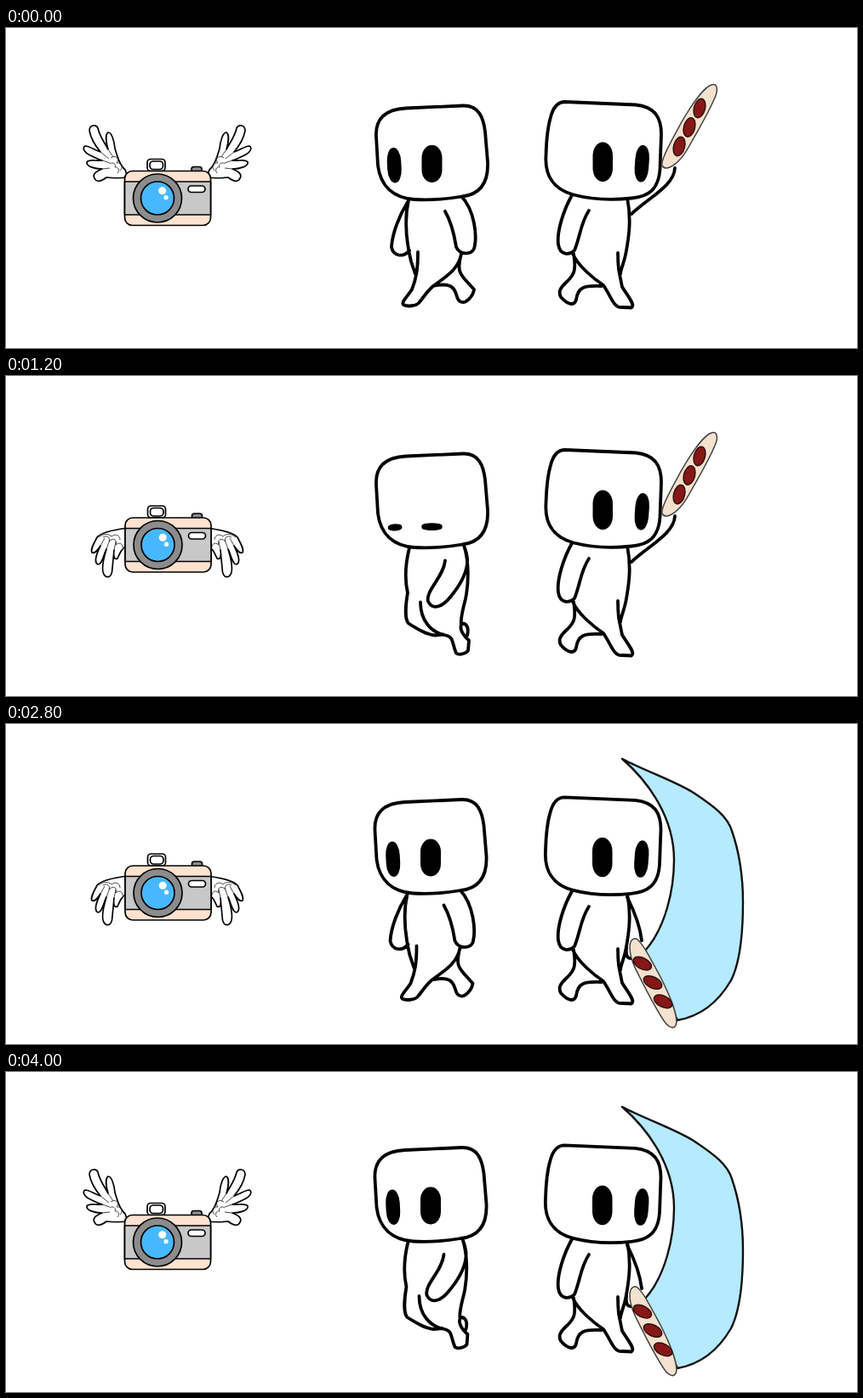
Recreate the animation shown at these times as an HTML page. Size 1000 px wide and 377 px high, loop 4200 ms.

```html
<!DOCTYPE html>
<html lang="en">
<head>
<meta charset="utf-8">
<title>Camera and walkers</title>
<style>
  html, body { margin: 0; width: 100%; height: 100%; overflow: hidden; background: #fff; }
  svg { display: block; width: 100%; height: 100%; }
  .line { fill: none; stroke: #000; stroke-width: 3.8; stroke-linecap: round; stroke-linejoin: round; }
  .solid { fill: #fff; }
  .thin { stroke: #000; stroke-width: 1.7; stroke-linejoin: round; }
  .curl { fill: none; stroke: #333; stroke-width: .9; }
</style>
</head>
<body>
<svg viewBox="0 0 1000 377" preserveAspectRatio="none">
  <defs>
    <g id="wing">
      <path class="thin solid" id="wingShape"/>
      <path class="curl" id="wingCurl"/>
    </g>
  </defs>

  <use href="#wing"/>
  <use href="#wing" transform="translate(379 0) scale(-1 1)"/>
  <g id="camera" class="thin">
    <rect x="166" y="154.5" width="21" height="14" rx="4" fill="#fff"/>
    <rect x="169" y="157" width="15.5" height="9.5" rx="4" fill="#fff"/>
    <path d="M218 169V166Q218 163.5 221 163.5H227Q230 163.5 230 166V169Z" fill="#8c8c8c"/>
    <rect x="139.5" y="168.500" width="101" height="64" rx="9" fill="#ffe2d0"/>
    <rect x="139.5" y="181" width="101" height="39" fill="#c8c8c8"/>
    <circle cx="178" cy="200.5" r="28.5" fill="#8c8c8c"/>
    <circle cx="178" cy="200.5" r="19.5" fill="#47b8ff"/>
    <g fill="#fff" stroke="none">
      <circle cx="183.7" cy="191.8" r="4.5"/>
      <circle cx="188" cy="199.7" r="2.6"/>
    </g>
    <rect x="214" y="186" width="20" height="7.5" rx="3.7" fill="#fff"/>
  </g>

  <path id="walkBody" class="line"/>
  <g id="walkHead">
    <path class="line solid" d="M470 94.5L537 91.5C556 91 561 106 563 122L566 158C567 182 557 196 536 198.5C515 202 495 203 480 202C455 200 440 186 437 162L435 128C434 108 444 96 470 94.5Z"/>
    <rect id="eyeL" x="448" width="16.5" rx="8" transform="rotate(-3 456 162)"/>
    <rect id="eyeR" x="488.5" width="24" rx="11.5"/>
  </g>

  <path class="line" d="M665 197C655 215 647 240 649 255C651 268 662 268 668 262C675 245 675 230 685 215M666 266C672 280 690 295 702 303C712 318 714 330 724 329L735 329.5C740 326 730 315 724 305L720 285C719 275 719 270 719 265M730 200C735 225 732 245 729 262C727 275 722 285 722 290M667 266C670 285 668 290 660 298C650 307 649 311 652 317C660 326 668 328 670 320C672 305 680 303 700 304"/>
  <path id="swingArm" class="line"/>
  <g id="fighterHead">
    <path class="line solid" d="M657 87L740 90.5C763 93 770 106 770 125L768.5 166C767 190 755 199 735 200.5C712 203 688 202 667 196.5C642 190 633 172 634.5 150C635 132 637 115 640 105C643 93 648 87 657 87Z"/>
    <rect x="689.5" y="134.5" width="23.5" height="46.5" rx="11.5" ry="16"/>
    <rect x="739" y="138" width="16.5" height="43.5" rx="8" ry="16" transform="rotate(4 747.5 160)"/>
  </g>
  <path id="slash" fill="#b5eaff" stroke="#111" stroke-width="2.4" stroke-linejoin="round"/>
  <g id="bat" stroke="#444" stroke-width="1.5">
    <path fill="#f5e2ce" d="M-7 55C-12 50 -11 25 -11 0C-10 -30 -6 -52 0 -57C5 -61 9 -55 10 -46C12 -25 11 0 10 25C9 42 2 60 -7 55Z"/>
    <g id="beads" fill="#851717" stroke="#301010"></g>
  </g>
</svg>

<script>
const STEP = 200, STEPS = 21;
const $ = id => document.getElementById(id);
const set = (id, attrs) => {
  for (const name in attrs) $(id).setAttribute(name, attrs[name]);
};

const raised = {
  shape: 'M140 167C134 162 131 152 128 142C127 132 124 123 120 123C117 125 117 133 120 143C116 135 110 128 108 118C106 113 98 114 98 121C100 132 106 140 111 146C104 144 98 139 93 139C89 141 92 147 99 150C105 153 109 155 113 156C106 157 97 154 95 158C94 163 104 166 113 166C107 168 101 172 104 177C106 182 112 181 118 176C126 177 134 177 143 176Z',
  curl: 'M120 143L126 152M111 146L121 154M113 156L122 159M113 166L122 165M123 153C129 149 134 154 130 159C136 158 138 164 134 168M122 160C126 157 130 161 128 164C132 163 134 168 131 171',
  camera: ''
};
const spread = {
  shape: 'M141 170C134 162 127 161 121 158C115 152 109 148 105 150C103 153 110 160 116 164C106 161 99 156 95 151C91 147 86 150 89 155C94 163 101 167 109 170C101 171 95 168 91 168C87 170 90 175 97 176C102 177 107 176 112 174C105 178 97 179 97 183C99 187 109 183 116 179C109 184 102 188 104 192C108 196 116 189 122 183C118 189 115 195 120 196C126 195 130 186 141 182Z',
  curl: 'M116 164L123 167M109 170L119 172M112 174L119 176M116 179L123 180M118 167C124 165 129 168 126 172C132 170 136 174 133 178M119 176C123 173 127 176 125 180C129 178 132 181 131 184',
  camera: 'translate(-3.8 -4.8) scale(1.02)'
};
const lowered = {
  shape: 'M143 179C128 181 112 184 107 190C103 198 99 204 101 208C105 210 108 204 111 200C106 210 103 220 108 222C113 222 114 212 118 204C114 217 111 232 117 236C123 239 125 232 125 226L127 205C126 212 127 217 131 215C134 208 136 203 143 199Z',
  curl: 'M111 200L116 191M118 204L122 193M127 205L129 195M114 190C119 187 123 191 121 195C127 189 131 194 129 199C134 195 137 198 137 202M109 190C115 185 121 186 124 189C129 185 134 188 134 193',
  camera: 'translate(.5 -1.5)'
};
const flap = [raised, spread, lowered, spread];

// Walk cycle: the figure offset each pose was drawn at, then its outline.
const walk = [
  [0, 0, 'M473 203C468 225 470 250 476 275L481 290M484 264C484 285 482 295 477 308C472 316 464 323 467 326C472 329 482 327 485 324C491 317 494 311 502 304C515 294 532 285 535 266C530 285 533 289 540 297L550 308C549 316 541 324 536 323C527 321 532 309 522 304Q515 301 502 304M516 216C524 230 527 245 529 258C533 267 546 268 550 260C554 246 551 215 535 198M472 205C462 221 454 242 453 258C455 269 467 271 474 262'],
  [-1, -2, 'M474 202C467 230 468 250 474 268C480 283 486 288 494 307M481 263C485 285 496 295 495 307L493 321C496 327 504 327 509 323L514 297C523 288 534 279 535 267M516 299C528 301 534 308 544 308C549 304 549 295 546 290C538 290 536 287 530 284M515 215L516 248C511 259 511 270 524 270C537 268 541 238 541 220C541 208 538 200 535 198M470 206C463 230 460 261 467 266C471 269 474 267 477 276'],
  [-1, -2, 'M474 201C466 225 467 252 473 275C476 291 489 302 508 306M483 264C488 288 503 298 511 308L510 320C514 327 524 325 526 320L524 298C536 285 541 270 542 236M526 294C536 294 542 300 538 310C534 314 528 312 525 308M514 214C510 235 492 250 495 263C502 275 514 267 522 258C536 240 542 225 541 212L537 197'],
  [-1.5, -2.5, 'M474 201C468 220 466 245 472 275C475 300 490 318 498 322C505 325 508 317 512 307M487 264C490 288 502 299 515 306C524 313 526 317 528 323C532 328 539 326 542 319C541 305 535 296 536 286C542 275 545 265 544 245L540 195M513 214C500 232 479 246 480 257C483 269 497 266 507 260C525 249 541 232 541 212M545 230C555 243 562 258 558 267C553 272 546 270 542 266'],
  [0, -2.5, 'M473 200C468 222 472 245 472 257C477 265 477 285 475 308C468 315 464 324 468 325L486 324C493 318 489 300 499 290M488 265C497 285 505 290 517 294C526 302 530 312 534 320C542 325 551 315 549 306C540 295 532 286 533 275C536 268 541 260 542 245M537 195C543 208 545 230 541 250M513 214C495 233 471 234 470 247C472 260 490 258 505 252C530 240 542 226 542 212M543 217C555 228 564 241 567 252C561 267 546 262 541 249'],
  [0, 0, 'M472 203C466 225 468 254 479 268C486 283 487 295 495 307C489 318 485 326 488 328L501 327C512 321 509 306 511 297M491 265C497 285 508 298 518 296C530 296 535 297 540 304C550 307 553 303 553 285C552 277 545 281 538 281C528 278 530 274 536 266C541 255 543 240 541 212M514 214C500 230 480 245 481 258C485 268 497 266 509 258C530 245 543 225 543 215C542 205 539 200 537 197M543 234C552 245 556 260 552 268C546 273 538 270 535 266'],
  [-2, -2.5, 'M472 200C467 220 467 240 470 253C467 270 467 285 471 289C482 296 492 302 502 303L512 302M485 264C485 285 497 300 515 303C524 305 522 312 527 324C531 327 539 324 541 321L542 309C534 302 530 294 534 289C540 289 542 295 540 303M536 197C542 215 542 240 538 260C534 275 532 285 533 290M514 215C512 235 491 250 494 263C500 275 512 268 520 258C535 240 541 225 540 212C539 204 537 200 536 197']
];

const slashTop = 'M724 41C750 55 786 67 808 81C832 97 848 109 853 126C862 152 866 180 866 ';
const slashInside = '785 160C785 110 755 68 724 41Z';
const swing = [
  { x: 803, y: 117, angle: 28, bead: -13, arm: 'M735 219C755 200 785 186 786 165', slash: '' },
  {
    x: 820, y: 207, angle: 92, bead: -25, arm: 'M732 213C742 222 756 217 768 208',
    slash: slashTop + '206L781 202C785 189 785 175 ' + slashInside
  },
  {
    x: 760, y: 304.5, angle: 151.5, bead: -34, arm: 'M730 204C738 220 745 238 747 255M729 264C728 275 731 277 737 276',
    slash: slashTop + '210C866 250 862 282 852 302C838 326 818 344 789 349L751 267C775 240 785 195 ' + slashInside
  }
];

const lids = { 5: .74, 6: .2, 7: .74 };

function drawCamera(step) {
  const pose = flap[step % 4];
  set('wingShape', { d: pose.shape });
  set('wingCurl', { d: pose.curl });
  set('camera', { transform: pose.camera });
}

function drawWalker(step) {
  const [dx, dy, outline] = walk[step % 7];
  const round = Math.floor(step / 7);
  const x = [0, -.5, -1.5][round];
  const y = [0, -2, -2.5][round];
  const open = lids[step] || 1;
  set('walkBody', { d: outline, transform: `translate(${x - dx} ${y - dy})` });
  set('walkHead', { transform: `translate(${x} ${y})` });
  set('eyeL', { y: 182.5 - 41.5 * open, height: 41.5 * open, ry: 16 * open });
  set('eyeR', { y: 182 - 44 * open, height: 44 * open, ry: 15 * open });
}

function drawFighter(step) {
  const pose = swing[step % 3];
  set('swingArm', { d: pose.arm });
  set('slash', { d: pose.slash });
  set('bat', { transform: `translate(${pose.x} ${pose.y}) rotate(${pose.angle})` });
  set('fighterHead', { transform: step % 3 ? 'translate(-.5 -.7)' : '' });
  $('beads').innerHTML = [-25.5, 0, 25.5].map(y =>
    `<ellipse rx="6.5" ry="11.5" transform="translate(0 ${y}) rotate(${pose.bead})"/>`).join('');
}

let shown = -1;
function render(time) {
  const step = Math.floor(time / STEP) % STEPS;
  if (step !== shown) {
    shown = step;
    drawCamera(step);
    drawWalker(step);
    drawFighter(step);
  }
}

const start = performance.now();
function tick() {
  render(performance.now() - start);
  requestAnimationFrame(tick);
}
tick();
</script>
</body>
</html>
```
